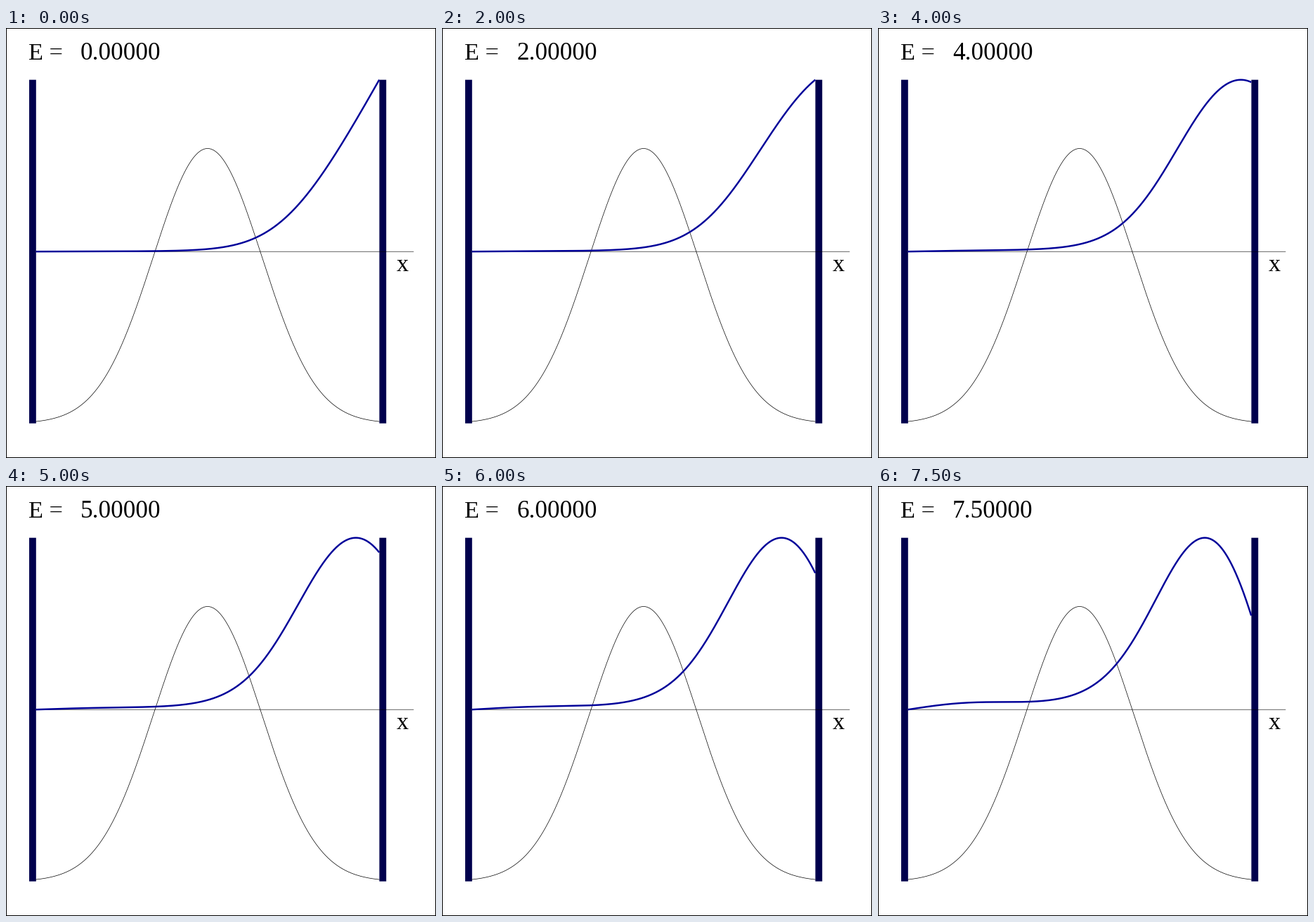
Recreate the animation shown at these times as a matplotlib script. Size 612x612 px, loop 8000 ms.

```python
import numpy as np
import matplotlib.pyplot as plt
from matplotlib.animation import FuncAnimation
from matplotlib.patches import Rectangle

SIZE = 612
FRAMES, STEP_MS = 16, 500
LEFT, RIGHT, WALL = 42.8, 531.4, 9.8
MID, HALF = 318.2, 244.5
TOP, BOTTOM = MID - HALF, MID + HALF
V0, V_MAX = 20, 25

x = np.linspace(-1, 1, 801)
V = V0 * np.exp(-5 * x**2)
px = np.linspace(LEFT, RIGHT, len(x)) - 0.2


def wave(E):
    """Numerov solution of psi'' = 2(V - E) psi with psi(-1) = 0, peak 1."""
    h = x[1] - x[0]
    t = h * h / 6 * (V - E)
    y = np.zeros_like(x)
    y[1] = h
    for i in range(1, len(x) - 1):
        y[i + 1] = 2 * y[i] - y[i - 1] + 12 * t[i] * y[i] / (1 - t[i])
    psi = y / (1 - t)
    return psi / np.abs(psi).max()


fig = plt.figure(figsize=(SIZE / 72, SIZE / 72), dpi=72, facecolor="black")
ax = fig.add_axes([0, 0, 1, 1])
ax.set_xlim(0, SIZE)
ax.set_ylim(SIZE, 0)
ax.axis("off")


def box(left, top, w, h, color):
    ax.add_patch(Rectangle((left, top), w, h, fc=color, lw=0, snap=False))


def label(left, base, s, size=34.2):
    return ax.text(left, base, s, family="Liberation Serif", size=size,
                   color="black", ha="left", va="baseline")


# the black figure shows as a one-pixel border
box(1, 1, SIZE - 2, SIZE - 2, "white")
for left in (LEFT - WALL, RIGHT):
    box(left, TOP, WALL, BOTTOM - TOP, "#00004d")
ax.plot([LEFT, 580], [MID, MID], color="black", lw=0.6, snap=False)
ax.plot(px, BOTTOM - V / V_MAX * 2 * HALF, color="black", lw=0.7)
curve, = ax.plot([], [], color="#000099", lw=2.45, solid_capstyle="butt")

label(32, 45, "E =")
label(555.4, 346, "x")
energy = label(106, 45, "", 35.3)


def update(i):
    E = i * STEP_MS / 1000
    curve.set_data(px, MID - wave(E) * HALF)
    energy.set_text(f"{E:.5f}")
    return curve, energy


anim = FuncAnimation(fig, update, frames=FRAMES, interval=STEP_MS,
                     repeat=True, repeat_delay=0)
plt.show()
```
